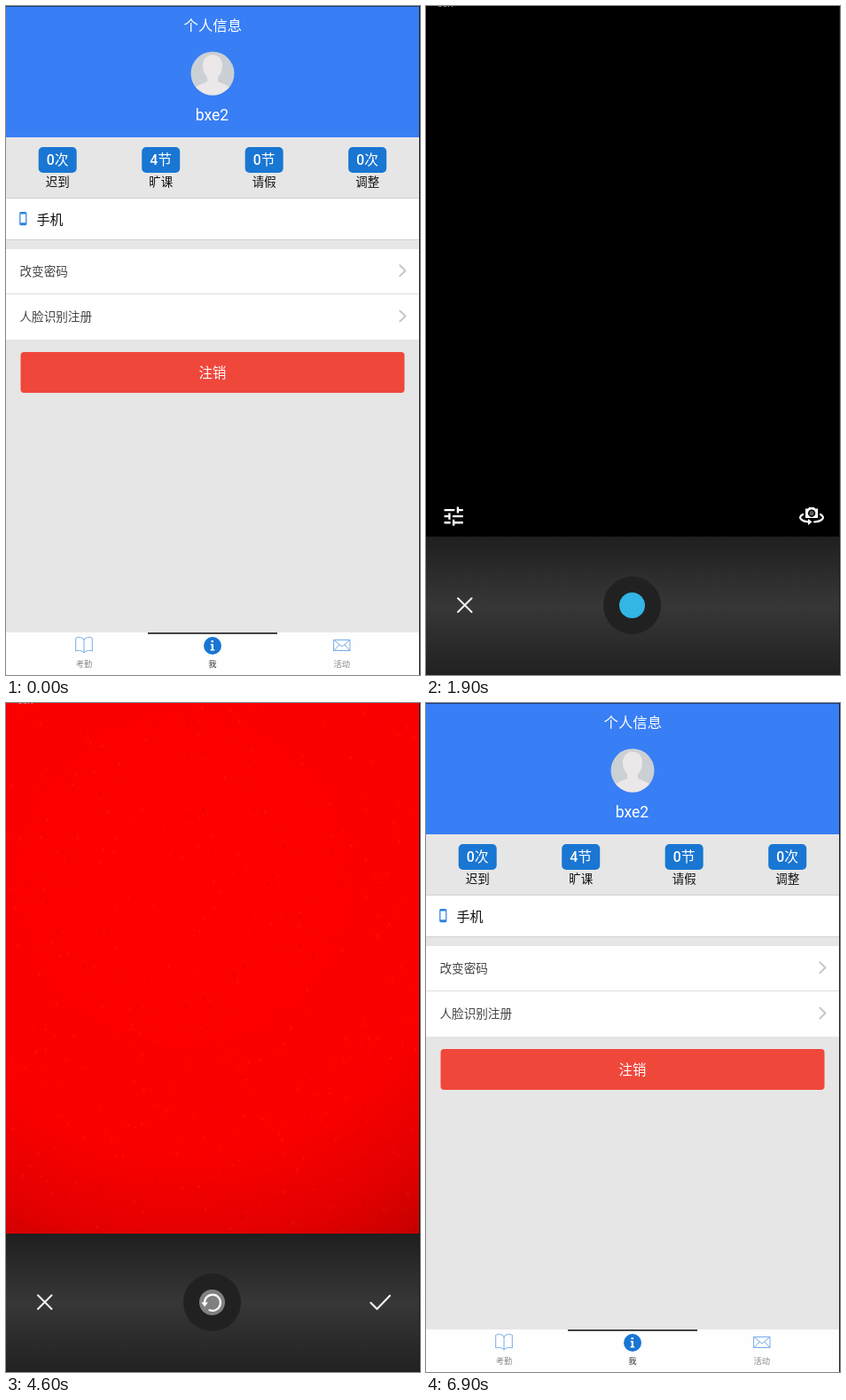
These frames come from a looping animation (467x754 px, 8200 ms). An HTML page:

```html
<!DOCTYPE html>
<html lang="zh-CN">
<head>
<meta charset="utf-8">
<title>个人信息</title>
<style>
html, body { margin: 0; width: 100%; height: 100%; overflow: hidden; background: #000; }
svg { display: block; width: 100%; height: 100%; }
text { font-family: Roboto, "Noto Sans CJK SC", "Noto Sans CJK JP", sans-serif; }
.line { fill: none; stroke-linecap: round; stroke-linejoin: round; }
</style>
</head>
<body>
<svg viewBox="0 0 467 754" xmlns="http://www.w3.org/2000/svg">
  <defs>
    <radialGradient id="red" gradientUnits="userSpaceOnUse" cx="200" cy="280" r="420">
      <stop offset="0" stop-color="#f80000"/>
      <stop offset=".4" stop-color="#ec0000"/>
      <stop offset=".75" stop-color="#cc0000"/>
      <stop offset="1" stop-color="#ae0000"/>
    </radialGradient>
    <radialGradient id="bright" gradientUnits="userSpaceOnUse" cx="200" cy="200" r="500">
      <stop offset="0" stop-color="#ff0000"/>
      <stop offset=".62" stop-color="#fa0000"/>
      <stop offset=".82" stop-color="#e20000"/>
      <stop offset="1" stop-color="#bc0000"/>
    </radialGradient>
    <linearGradient id="bar" x1="0" y1="0" x2="0" y2="1">
      <stop offset="0" stop-color="#1f1f1f"/>
      <stop offset=".5" stop-color="#373737"/>
      <stop offset="1" stop-color="#212121"/>
    </linearGradient>
    <clipPath id="face"><circle cx="233" cy="76" r="24.5"/></clipPath>
  </defs>

  <g id="page">
    <rect width="467" height="754" fill="#e6e6e6"/>
    <rect width="467" height="148" fill="#387ef5"/>
    <rect width="467" height="1" fill="#1d3f7a"/>
    <g clip-path="url(#face)">
      <rect x="208" y="51" width="50" height="50" fill="#cbd0d4"/>
      <path d="M222 67c0-8 5-12 11-12s11 4 11 12c0 6-2 10-5 13v5c5 3 13 4 15 9v8h-42v-8c2-5 10-6 15-9v-5c-3-3-5-7-5-13z" fill="#ece7e8"/>
    </g>
    <rect y="216" width="467" height="48" fill="#d0d0d0"/>
    <rect y="217" width="467" height="46" fill="#fff"/>
    <rect y="274" width="467" height="102" fill="#fff"/>
    <rect id="pressed" y="325" width="467" height="51" fill="#d9d9d9"/>
    <rect y="324" width="467" height="1" fill="#dedede"/>
    <path d="M16.8 232h5a1.6 1.6 0 0 1 1.6 1.6v12a1.6 1.6 0 0 1-1.6 1.6h-5a1.6 1.6 0 0 1-1.6-1.6v-12a1.6 1.6 0 0 1 1.6-1.6zM16.4 234.6v9.6h5.8v-9.6z" fill="#2f82dd" fill-rule="evenodd"/>
    <path class="line" d="M444.3 292.3l6.2 6-6.2 6M444.3 343.5l6.2 6-6.2 6" stroke="#c7c7cc" stroke-width="2"/>
    <rect x="16.5" y="390" width="433" height="46" rx="4" fill="#f0473b"/>
    <rect y="706" width="467" height="48" fill="#fefefe"/>
    <rect x="160" y="706" width="146" height="2" fill="#444"/>
    <path class="line" d="M88 714c-2-3-7-3-9.300-1.500v14.500c3-1 7-1 9.300 2 2.300-3 6.300-3 9.300-2v-14.500c-2.300-1.500-7.300-1.500-9.300 1.500zv14.500" stroke="#74ace8"/>
    <path class="line" d="M370 714.500h18v12h-18zl9 7.500 9-7.500M370 726.500l6-6.500M388 726.500l-6-6.500" stroke="#74ace8"/>
    <circle cx="233" cy="721" r="10" fill="#1976d2"/>
    <path d="M231.500 715h2.500v2.300h-2.500zM230.800 719h3.200v6h1.200v1.400h-4.600v-1.400h1.200v-4.600h-1z" fill="#fff"/>
  </g>

  <rect id="dim" width="467" height="754"/>

  <g id="loader">
    <rect x="200.500" y="343" width="65.500" height="69.500" rx="4" fill="#000" fill-opacity=".7" stroke="#888" stroke-opacity=".4"/>
    <path id="arc" class="line" d="M244 379A12 12 0 0 1 230 386" stroke="#8fb6f0" stroke-width="3"/>
  </g>

  <g id="popup">
    <rect x="111.500" y="303" width="243" height="149.500" fill="#f5f5f5"/>
    <rect x="111.500" y="349" width="243" height="1" fill="#e9e9e9"/>
    <rect id="ok" x="121.500" y="399" width="223" height="44" rx="2"/>
  </g>

  <g id="camera">
    <rect width="467" height="754"/>
    <g id="preview">
      <rect width="467" height="598" fill="url(#red)"/>
      <rect id="glow" width="467" height="598" fill="url(#bright)"/>
      <path id="light" class="line" stroke="#ff5a20" stroke-opacity=".3"/>
      <path id="dark" class="line" stroke="#700000" stroke-opacity=".28"/>
      <rect id="shade" width="467" height="598"/>
    </g>
    <rect y="598" width="467" height="156" fill="url(#bar)"/>
    <g id="options">
      <path transform="translate(17 561) scale(1.18)" fill="#fff" d="M3 17v2h6v-2H3zM3 5v2h10V5H3zm10 16v-2h8v-2h-8v-2h-2v6h2zM7 9v2H3v2h4v2h2V9H7zm14 4v-2H11v2h10zm-6-4h2V7h4V5h-4V3h-2v6z"/>
      <path fill="#fff" fill-rule="evenodd" d="M428 566.500h3l1-1.500h6l1 1.500h3v10.500h-14zM435 567.500a4.200 4.200 0 1 0 .1 0z"/>
      <circle cx="435" cy="571.700" r="2.600" fill="#fff" fill-opacity=".35"/>
      <path class="line" d="M425 573c-7 4 0 8 7 8.500M445 573c7 4 0 8-7 8.500" stroke="#fff" stroke-width="2.200"/>
      <path d="M431 578l4.500 3.500-4.500 3.500z" fill="#fff"/>
    </g>
    <path class="line" d="M36 667.500l15.500 15.500M51.500 667.500l-15.500 15.500" stroke="#f2f2f2" stroke-width="2"/>
    <circle cx="232.500" cy="675.500" r="32.500" fill="#212121"/>
    <g id="shutter">
      <circle id="ring" cx="232.500" cy="675.500" fill="none" stroke="#2b7b97" stroke-width="6"/>
      <circle cx="232.500" cy="675.500" r="14.500" fill="#33b5e5"/>
    </g>
    <g id="review">
      <circle id="ghost" cx="232.500" cy="675.500" r="14.500" fill="#808080"/>
      <path class="line" d="M224 677a9 9 0 1 1 5.500 7.200" stroke="#fff" stroke-width="2.200"/>
      <path d="M220.300 675.500h7.600l-3.800 5z" fill="#fff"/>
      <path class="line" d="M411.500 676l7 7 14.500-15" stroke="#f2f2f2" stroke-width="2.200"/>
    </g>
  </g>
  <rect x="466" width="1" height="754" fill="#1c1c1c"/>
</svg>
<script>
const LOOP = 8200, STEP = 100;
const NS = 'http://www.w3.org/2000/svg';
const el = Object.fromEntries([...document.querySelectorAll('g[id], rect[id], path[id], circle[id]')].map(n => [n.id, n]));

function add(parent, tag, attrs) {
  const node = document.createElementNS(NS, tag);
  for (const k in attrs) node.setAttribute(k, attrs[k]);
  parent.append(node);
  return node;
}

// y is the optical middle of the line
function label(parent, str, x, y, size, fill, anchor = 'middle', weight = 400) {
  add(parent, 'text', {
    x, y: y + size * 0.37, fill, 'font-size': size, 'text-anchor': anchor, 'font-weight': weight
  }).textContent = str;
}

label(el.page, '个人信息', 233.3, 22, 16.4, '#fff');
label(el.page, 'bxe2', 232.5, 122, 17.6, '#fff');
[['0次', '迟到'], ['4节', '旷课'], ['0节', '请假'], ['0次', '调整']].forEach(([count, name], i) => {
  const x = 58.2 + i * 116.5;
  add(el.page, 'rect', { x: x - 21.5, y: 159, width: 43, height: 29, rx: 5, fill: '#1976d2' });
  label(el.page, count, x, 173.3, 15.8, '#fff', 'middle', 500);
  label(el.page, name, x, 198, 13.5, '#111');
});
label(el.page, '手机', 34.5, 240.5, 15, '#111', 'start');
label(el.page, '改变密码', 15.5, 299, 13.6, '#444', 'start');
label(el.page, '人脸识别注册', 15.5, 350.3, 13.6, '#444', 'start');
label(el.page, '注销', 233, 413.5, 15.4, '#fff');
label(el.page, '考勤', 88, 742, 9.3, '#888');
label(el.page, '我', 233, 742, 9.3, '#333');
label(el.page, '活动', 378.7, 742, 9.3, '#888');
label(el.popup, '提示', 233, 325.5, 14, '#111');
label(el.popup, '你已经注册人脸', 121.8, 370, 13.5, '#111', 'start');
label(el.popup, 'OK', 233, 421.3, 16.5, '#fff');
label(el.camera, 'SCN', 13, -2, 9, '#aaa', 'start');

function random(seed) {
  return () => (seed = (seed * 16807) % 2147483647) / 2147483647;
}

function grain(seed, count) {
  const rnd = random(seed);
  let d = '';
  for (let i = 0; i < count; i++) {
    d += `M${(rnd() * 465).toFixed(1)} ${(rnd() * 596).toFixed(1)}l${(rnd() * 3 - 1.5).toFixed(1)} ${(rnd() * 3).toFixed(1)}`;
  }
  return d;
}

// piecewise linear value from [time, value] pairs
function track(points, t) {
  if (t <= points[0][0]) return points[0][1];
  for (let i = 1; i < points.length; i++) {
    const [t0, v0] = points[i - 1], [t1, v1] = points[i];
    if (t <= t1) return v0 + (v1 - v0) * (t - t0) / (t1 - t0);
  }
  return points[points.length - 1][1];
}

const DIM = [[1300, 0], [1500, 0.4], [4900, 0.2], [5000, 0.4], [6800, 0.4], [6900, 0]];
const LOADER = [[1300, 0], [1400, 0.2], [1500, 0.55], [1700, 1], [4900, 0], [5000, 0.35], [5100, 0.8], [5200, 1], [5300, 0.6], [5400, 0.25]];
const SCALE = [[5500, 1.175], [5600, 1.08], [5700, 1.02], [5800, 1]];
const FADE = [[5500, 0.35], [5600, 0.8], [5700, 1]];
const SHADE = [[2700, 0.6], [2900, 0.25], [3200, 0]];
const GLOW = [[3300, 0], [4400, 1]];
const RING = [[3100, 15], [3300, 21], [3500, 21], [3700, 15]];

const within = (t, a, b) => t >= a && t < b;
const show = (node, on) => node.setAttribute('display', on ? 'inline' : 'none');
const fade = (node, value) => node.setAttribute('opacity', value);

function draw(t) {
  const camera = within(t, 1900, 4900);
  show(el.camera, camera);
  show(el.pressed, within(t, 1100, 1400));
  fade(el.dim, within(t, 1400, 6900) ? track(DIM, t) : 0);

  show(el.loader, within(t, 1400, 1900) || within(t, 4900, 5500));
  fade(el.loader, track(LOADER, t));
  el.arc.setAttribute('transform', `rotate(${(t - 1500) * 0.5} 232.5 375)`);

  show(el.popup, within(t, 5500, 6900));
  fade(el.popup, track(FADE, t));
  const s = track(SCALE, t);
  el.popup.setAttribute('transform', `translate(233 377.8) scale(${s}) translate(-233 -377.8)`);
  el.ok.setAttribute('fill', t >= 6700 ? '#0c60ee' : '#387ef5');

  if (!camera) return;
  const review = t >= 4600;
  show(el.preview, t >= 2700);
  show(el.options, !review);
  show(el.shutter, !review);
  show(el.review, review);
  fade(el.shade, track(SHADE, t));
  fade(el.glow, track(GLOW, t));
  const seed = Math.min(t, 4400);
  el.light.setAttribute('d', grain(seed * 7 + 11, 260));
  el.dark.setAttribute('d', grain(seed * 13 + 5, 200));
  show(el.ring, within(t, 3200, 3700));
  el.ring.setAttribute('r', track(RING, t));
  fade(el.ghost, track([[4600, 1], [4800, 0]], t));
}

const start = performance.now();
let last = -1;
function tick() {
  const time = Math.max(0, performance.now() - start) % LOOP;
  const t = Math.floor(time / STEP) * STEP;
  if (t !== last) draw(last = t);
  requestAnimationFrame(tick);
}
tick();
</script>
</body>
</html>
```
